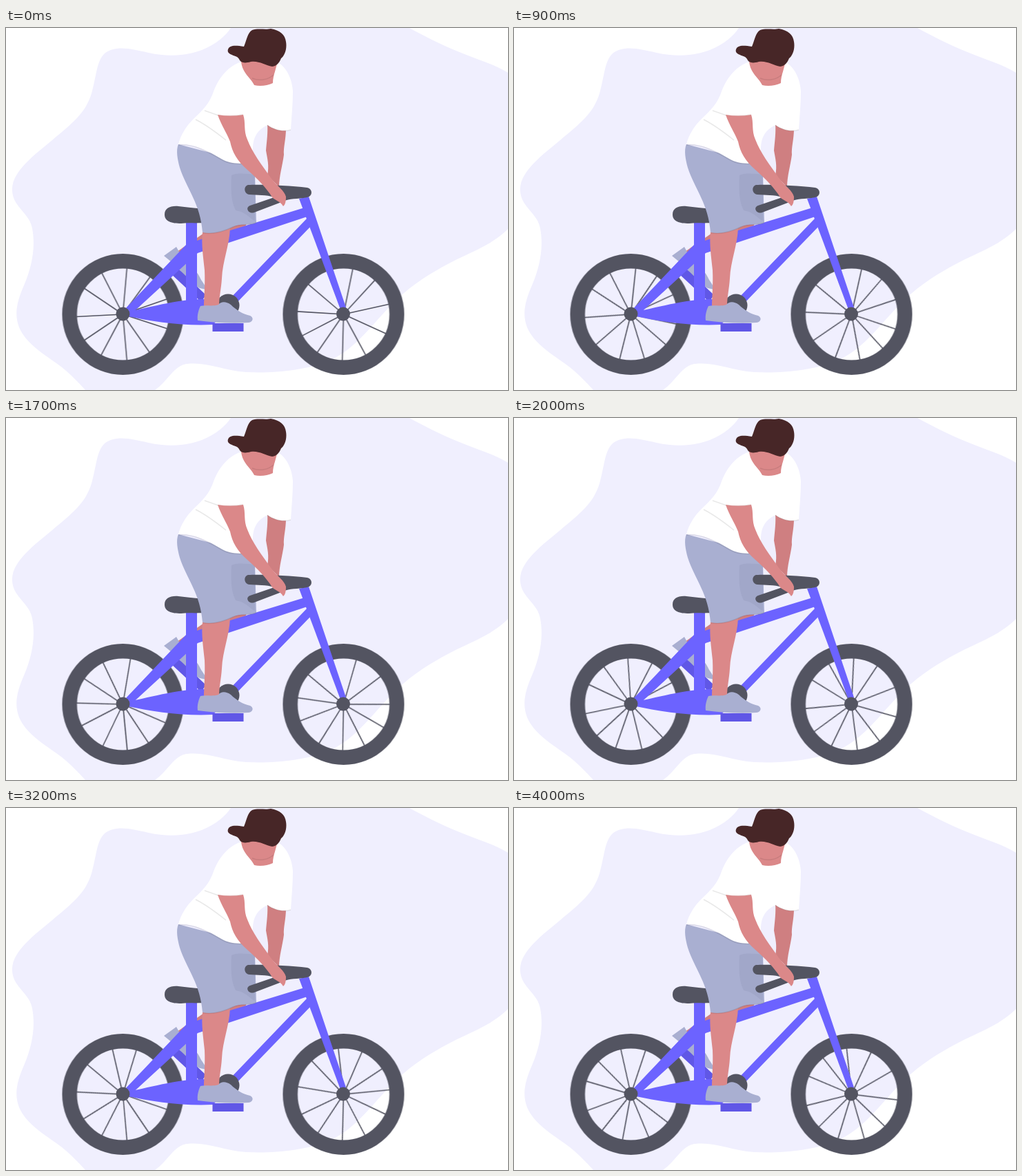
These frames come from a looping animation (728x526 px, 4.1 s). An HTML page:

```html
<!DOCTYPE html>
<html lang="en">
<head>
<meta charset="utf-8">
<title>Cyclist</title>
<style>
  html, body { margin: 0; width: 100%; height: 100%; overflow: hidden; background: #fff; }
  svg { display: block; width: 728px; height: 526px; }
  .dark { fill: #535461; }
  .blue { fill: #6c63ff; }
  .deep { fill: #6057e6; }
  .cloth { fill: #a9afd1; }
  .skin { fill: #db8889; }
  .shade { fill: #cf7f81; }
  .tyre { fill: none; stroke: #535461; stroke-width: 21.5; }
  .spokes { stroke: #535461; stroke-width: 1.6; }
  .fold { fill: none; stroke: #000; stroke-width: 1.5; opacity: .09; }
</style>
</head>
<body>
<svg viewBox="0 0 728 526">
  <path fill="#f0effe" d="M115 526C102 512 90 499 73 487C52 472 29 458 19 435C11 414 17 395 26 374C38 346 43 318 38 291C34 268 8 260 9 233C10 207 43 183 67 163C95 139 115 125 124 95C131 72 131 48 143 37C159 24 184 31 207 36C234 42 258 41 284 32C304 24 318 12 326 0H585C604 10 628 23 655 34C684 46 709 53 728 65V292C702 318 667 328 637 345C604 363 582 379 560 401C530 432 508 465 470 483C435 498 385 502 348 500C316 498 292 485 263 488C243 490 237 511 216 526Z"/>

  <!-- far leg -->
  <path class="shade" d="M248 325L290 296L350 283L346 290L322 297L288 308L252 334Z"/>
  <path class="cloth" d="M229 331L247 318L252 327C263 340 276 352 281 362C284 369 289 372 290 380L281 378C266 371 258 361 251 350C246 344 237 338 229 331Z"/>

  <g id="wheels"></g>

  <!-- frame -->
  <path class="deep" d="M239 357L249 349L290 388L283 398Z"/>
  <path class="blue" d="M172 409L262 314L283 307L433 261L440 273L278 327L178 419Z"/>
  <path class="blue" d="M261 282H277V403H261Z"/>
  <path class="blue" d="M172 413C205 407 252 393 288 394L325 393L437 276L444 286L331 403L300 431C255 433 215 427 172 418Z"/>
  <path class="blue" d="M425 248L439 245L493 406L485 409Z"/>
  <g class="dark">
    <circle cx="169.5" cy="415.5" r="10"/>
    <circle cx="489" cy="415.5" r="10"/>
    <circle cx="322" cy="403" r="16.5"/>
    <path d="M230 271C230 262 238 258 250 259C262 260 272 262 290 263V282C277 285 266 282 254 284C240 284 230 281 230 271Z"/>
  </g>
  <path class="deep" d="M299.500 429H344.500V441H299.500Z"/>

  <!-- near leg -->
  <path class="skin" d="M285 296L325 291C324 316 314 339 313 364C312 380 309 390 309 405H287C287 391 289 374 288 352C286 332 283 314 285 296Z"/>
  <path class="cloth" d="M282 404C290 402 299 405 308 402C312 397 319 397 326 402C334 410 344 416 354 418C360 421 358 427 352 428C328 430 302 428 278 425C277 418 279 410 282 404Z"/>
  <path class="cloth" d="M250 169C246 178 249 192 252 203C262 234 282 255 285 297C301 300 315 296 329 289C341 283 351 288 363 283L361 212L345 194Z"/>
  <path fill="#a1a7c9" d="M327 214C336 210 350 212 361 213V280C354 278 350 268 333 265C326 252 326 232 327 214Z"/>
  <path class="fold" d="M286 298C302 300 315 296 329 289C341 284 351 288 363 283"/>

  <!-- upper body -->
  <path class="shade" d="M379 139L406 146C406 162 402 174 403 184C401 200 396 215 396 231L379 214C382 200 379 190 377 178C378 165 380 153 379 139Z"/>
  <path class="dark" d="M351 228C372 227 411 229 437 232C445 234 445 244 437 246C422 249 411 247 402 252L360 268C352 271 346 261 354 258L389 246C377 242 365 243 353 242C345 241 344 230 351 228Z"/>
  <path fill="#fff" d="M342 49C320 55 306 77 300 95C295 109 286 119 272 132C261 143 253 156 250 169C271 167 292 178 312 190C324 197 336 198 352 196L358 176C358 156 367 147 379 141C390 149 403 151 413 148C414 130 416 111 416 92C415 75 408 59 396 51Z"/>
  <path class="fold" d="M250 170C271 168 292 179 312 191C322 197 333 198 343 197M288 120L308 127M275 133C291 141 304 151 319 163M307 127Q325 129 344 126M379 141C390 149 403 151 413 148"/>
  <path class="skin" d="M307 126Q325 129 344 126C348 138 344 148 350 162C357 181 371 199 385 219C394 231 403 235 406 245C406 252 405 257 402 259C397 251 391 251 386 246C379 234 364 218 350 206C335 193 328 180 325 165C320 152 312 141 307 126Z"/>
  <path class="skin" d="M341 45H394C393 58 387 68 387 80C379 84 368 85 360 83C354 71 343 66 341 49Z"/>
  <path class="fold" d="M357 73C366 77 380 76 388 68"/>
  <path fill="#472627" d="M322 31C324 25 332 25 345 27C349 18 350 7 357 3C365 0 377 3 384 1C397 3 405 10 406 20C408 32 403 41 399 44C396 51 393 55 386 56C376 54 366 47 355 49C345 52 340 50 338 45C335 40 330 41 328 39C322 37 321 34 322 31Z"/>
</svg>
<script>
  const LOOP = 4100, STEPS = 41, TURNS = 2;
  const spokeAngles = [19, 54, 85, 117, 146, 183, 214, 242, 275, 305, 342];
  const wheels = document.getElementById('wheels');

  function add(parent, tag, attrs) {
    const el = document.createElementNS('http://www.w3.org/2000/svg', tag);
    for (const key in attrs) el.setAttribute(key, attrs[key]);
    return parent.appendChild(el);
  }

  function addWheel(x, y, phase) {
    const wheel = add(wheels, 'g', { transform: `translate(${x} ${y})` });
    const spokes = add(wheel, 'g', { class: 'spokes' });
    for (const deg of spokeAngles) {
      const a = (deg + phase) * Math.PI / 180;
      add(spokes, 'line', { x1: 0, y1: 0, x2: 68 * Math.cos(a), y2: -68 * Math.sin(a) });
    }
    add(wheel, 'circle', { class: 'tyre', r: 77.3 });
    const spin = spokes.animate(
      [{ transform: 'rotate(0deg)' }, { transform: `rotate(${360 * TURNS}deg)` }],
      { duration: LOOP, iterations: Infinity, easing: `steps(${STEPS}, end)` }
    );
    spin.startTime = 0;
  }

  addWheel(169.5, 416, 0);
  addWheel(489.5, 416, -6.5);
</script>
</body>
</html>
```
